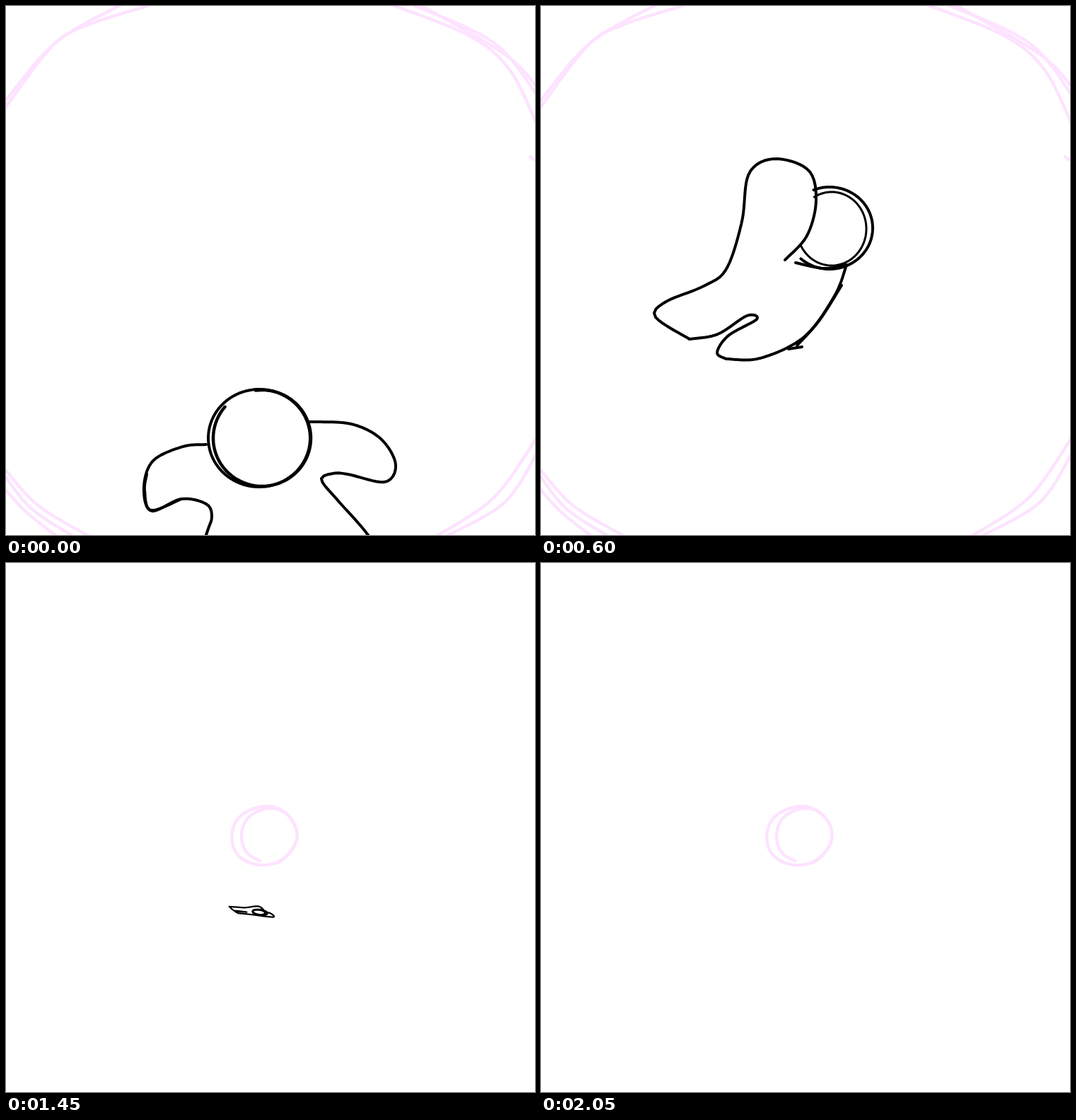
These frames come from a looping animation (748 by 748 pixels, 2100 ms). An HTML page with a canvas:

```html
<!DOCTYPE html>
<html lang="en">
<head>
<meta charset="utf-8">
<title>Tumble</title>
<style>
html, body { margin: 0; width: 100%; height: 100%; overflow: hidden; background: #fff; }
canvas { display: block; }
</style>
</head>
<body>
<canvas id="stage" width="748" height="748"></canvas>
<script>
const ctx = document.getElementById('stage').getContext('2d');
const SIZE = 748, STEP = 50, LOOP = 2100, SAMPLES = 90;
const PINK = '#fde3ff', INK = '#000';
const PARTS = ['head', 'rim', 'left', 'legs', 'right'];
const START = performance.now();

const lerp = (a, b, u) => a + (b - a) * u;
const fill = (n, fn) => Array.from({ length: n }, (_, i) => fn(i));

// Dense smooth curve through a flat list of x, y values.
function smooth(flat) {
  const p = fill(flat.length / 2, i => [flat[2 * i], flat[2 * i + 1]]), out = [];
  for (let i = 0; i < p.length - 1; i++) {
    const a = p[i - 1] || p[i], b = p[i], c = p[i + 1], d = p[i + 2] || c;
    for (let k = 0; k < 10; k++) {
      const t = k / 10;
      out.push([0, 1].map(n => b[n] + 0.5 * t * (c[n] - a[n] +
        t * (2 * a[n] - 5 * b[n] + 4 * c[n] - d[n] + t * (3 * (b[n] - c[n]) + d[n] - a[n])))));
    }
  }
  out.push(p[p.length - 1]);
  return out;
}

// Even spacing along the curve, so that strokes can blend.
function resample(pts) {
  const len = [0];
  for (let i = 1; i < pts.length; i++)
    len.push(len[i - 1] + Math.hypot(pts[i][0] - pts[i - 1][0], pts[i][1] - pts[i - 1][1]));
  let j = 0;
  return fill(SAMPLES, i => {
    const want = len[len.length - 1] * i / (SAMPLES - 1);
    while (j < pts.length - 2 && len[j + 1] < want) j++;
    const u = (want - len[j]) / (len[j + 1] - len[j] || 1);
    return [lerp(pts[j][0], pts[j + 1][0], u), lerp(pts[j][1], pts[j + 1][1], u)];
  });
}

function arc([cx, cy, rx, ry, from = -1.7, to = 4.65, tilt = 0]) {
  const c = Math.cos(tilt), s = Math.sin(tilt);
  return fill(SAMPLES, i => {
    const a = lerp(from, to, i / (SAMPLES - 1)), x = rx * Math.cos(a), y = ry * Math.sin(a);
    return [cx + x * c - y * s, cy + x * s + y * c];
  });
}

// Sketchy loop that drifts from one ellipse to the next, one per turn.
function scribble(ellipses, from, wobble, phase) {
  const turns = ellipses.length - 0.1, n = Math.round(turns * 50);
  return [fill(n, i => {
    const k = i / 50, at = Math.min(k, ellipses.length - 1.001), j = Math.floor(at);
    const mix = (at - j) ** 3, next = ellipses[j + 1] || ellipses[j];
    const [cx, cy, rx, ry] = ellipses[j].map((v, m) => lerp(v, next[m], mix));
    const a = from + k * 2 * Math.PI;
    const r = 1 + wobble * Math.cos(2 * (a - phase)) + wobble / 2 * Math.cos(5 * a + j);
    return [cx + rx * r * Math.cos(a), cy + ry * r * Math.sin(a)];
  })];
}

function trace(pts, color, width) {
  ctx.beginPath();
  for (const [x, y] of pts) ctx.lineTo(x, y);
  ctx.strokeStyle = color;
  ctx.lineWidth = width;
  ctx.stroke();
}

// The legs run from the end of the left side to the end of the right side.
function makePose(time, { head, rim, left, legs, right, extra = [] }, width = {}) {
  const curve = flat => resample(smooth(flat));
  return {
    time, width, head: arc(head), rim: arc(rim),
    left: curve(left),
    legs: curve([...left.slice(-2), ...legs]),
    right: curve([...right, ...legs.slice(-2)]),
    extra: extra.map(smooth)
  };
}

const rise = makePose(0, {
  head: [358, 611, 72, 69],
  rim: [362, 611, 69, 68, -1.7, 3.85],
  left: [283,620, 250,623, 208,643, 195,680, 205,714, 248,697, 283,704, 291,722, 283,748, 250,850],
  legs: [400,810, 570,830],
  right: [429,588, 488,591, 530,612, 551,648, 536,673, 483,662, 462,661, 446,670, 470,700, 512,748],
  extra: [[199,662, 196,685, 205,713, 248,697]]
}, { rim: 4.5 });

const wave = makePose(400, {
  head: [393, 288, 64, 59],
  rim: [388, 291, 58, 55],
  left: [325,310, 300,266, 268,244, 230,242, 198,272, 203,306, 256,323, 290,355, 292,412, 268,470, 251,508, 290,536],
  legs: [334,511, 356,471, 402,454, 420,475, 430,525, 440,532],
  right: [459,281, 515,313, 546,358, 515,398, 475,372, 451,348, 484,425, 494,493],
  extra: [[458,285, 445,330, 412,354, 367,334], [480,485, 477,505, 462,526], [454,358, 498,405], [404,450, 423,472, 432,526]]
});

const turn = makePose(600, {
  head: [408, 314, 61, 58, -1.95, 2.3],
  rim: [411, 315, 49, 52, -2.1, 2.7],
  left: [345,359, 376,325, 389,275, 378,232, 330,216, 294,237, 284,305, 262,372, 230,396, 175,419, 162,440, 210,471],
  legs: [250,464, 291,438, 305,443, 265,466, 249,490, 262,499],
  right: [432,366, 415,410, 372,468, 310,498],
  extra: [[425,395, 394,444, 362,480], [360,363, 400,371, 432,366], [350,485, 369,482]]
}, { rim: 3 });

const cling = makePose(900, {
  head: [667, 355, 35, 33],
  rim: [675, 352, 20, 25, -1.7, 0.7],
  left: [637,346, 618,329, 600,338, 607,375, 611,415, 589,480],
  legs: [618,491, 635,473, 645,448, 657,451, 641,493, 665,500],
  right: [697,346, 712,325, 733,350, 720,416, 690,470]
});

const dive = makePose(1200, {
  head: [224, 259, 34, 12, -1.7, 4.65, -0.5],
  rim: [228, 257, 28, 11, -1.7, 4.2, -0.5],
  left: [205,272, 185,284, 160,281, 200,255, 240,233, 302,196],
  legs: [320,196, 273,224, 320,196, 352,196],
  right: [230,267, 218,278, 248,276, 290,237, 320,217]
}, { head: 5, rim: 4.5 });

const POSES = [rise, wave, turn, cling, dive];
const BULGE = [[0, 0], [0, -15], [30, 60], [0, -90]];

const bigRing = [
  [-4,148, 65,57, 115,27, 200,0],
  [-4,138, 70,52, 165,-3],
  [545,-2, 655,42, 712,90, 750,166],
  [572,-3, 690,52, 752,128],
  [585,-2, 705,68, 752,116],
  [741,213, 746,217],
  [752,608, 690,695, 608,750],
  [752,630, 705,702, 622,750],
  [-4,652, 45,706, 118,750],
  [-4,661, 35,710, 95,750],
  [-4,680, 28,715, 72,750]
].map(smooth);

const midRing = scribble([[385,372,258,252], [366,372,274,248], [380,371,254,248]], 2.2, 0.015, -0.2);
const lowRing = scribble([[373,395,114,98], [363,382,107,103], [366,383,104,100]], -2.6, 0.015, 0);
const dotRing = scribble([[372,385,39,38], [365,386,46,42]], 1.9, 0.02, -0.7);

// Turns and scales strokes about one point and moves that point to another.
const spin = (strokes, scale, angle, cx, cy, tx = cx, ty = cy) => {
  const c = Math.cos(angle) * scale, s = Math.sin(angle) * scale;
  return strokes.map(pts => pts.map(([x, y]) =>
    [tx + (x - cx) * c - (y - cy) * s, ty + (x - cx) * s + (y - cy) * c]));
};

const RINGS = [
  bigRing, spin(midRing, 1.33, 0.5, 369, 372), midRing,
  spin(lowRing, 1.66, -0.6, 370, 385), lowRing, dotRing
];
const HUB = [357, 417];

function drawRing(t) {
  for (const pts of RINGS[t / STEP % RINGS.length]) trace(pts, PINK, 4.4);
}

function drawBody(t) {
  const i = POSES.findLastIndex(p => p.time <= t);
  const a = POSES[i], b = POSES[i + 1] || a;
  let u = a === b ? 0 : (t - a.time) / (b.time - a.time);
  if (i === 0) u = 1 - (1 - u) ** 2;
  const lift = Math.sin(Math.PI * u), [dx, dy] = BULGE[i] || [0, 0];
  for (const part of PARTS) {
    const pts = a[part].map(([x, y], k) =>
      [lerp(x, b[part][k][0], u) + dx * lift, lerp(y, b[part][k][1], u) + dy * lift]);
    trace(pts, INK, lerp(a.width[part] || 4, b.width[part] || 4, u));
  }
  if (u === 0) for (const pts of a.extra) trace(pts, INK, 4);
}

// Spiral into the hub while shrinking.
function drawFall(t) {
  const u = (t - dive.time) / 400, scale = (1 - u) ** 1.2;
  const angle = Math.atan2(-177, -102) - u * 4, r = 204 * (1 - u);
  spin(PARTS.map(p => dive[p]), scale, -u * 4, 255, 240, HUB[0] + r * Math.cos(angle), HUB[1] + r * Math.sin(angle))
    .forEach((pts, i) => trace(pts, INK, (dive.width[PARTS[i]] || 4) * Math.sqrt(scale)));
}

function drawSpark(size) {
  const [x, y] = HUB, r = 29 * size;
  ctx.beginPath();
  ctx.moveTo(x + 1, y - r);
  for (const [dx, dy] of [[1, 0], [0, 1], [-1, 0], [0, -1]])
    ctx.quadraticCurveTo(x, y, x + dx * r, y + dy * r);
  ctx.closePath();
  ctx.strokeStyle = INK;
  ctx.lineWidth = Math.max(2, 4 * size);
  ctx.stroke();
}

function frame(now) {
  const t = Math.floor(Math.max(0, now - START) % LOOP / STEP) * STEP;
  ctx.fillStyle = '#fff';
  ctx.fillRect(0, 0, SIZE, SIZE);
  ctx.lineCap = ctx.lineJoin = 'round';
  drawRing(t);
  if (t <= dive.time) drawBody(t);
  else if (t < 1600) drawFall(t);
  else if (t < 1900) drawSpark(1 - Math.abs(t - 1700) / 200);
  requestAnimationFrame(frame);
}
frame(START);
</script>
</body>
</html>
```
